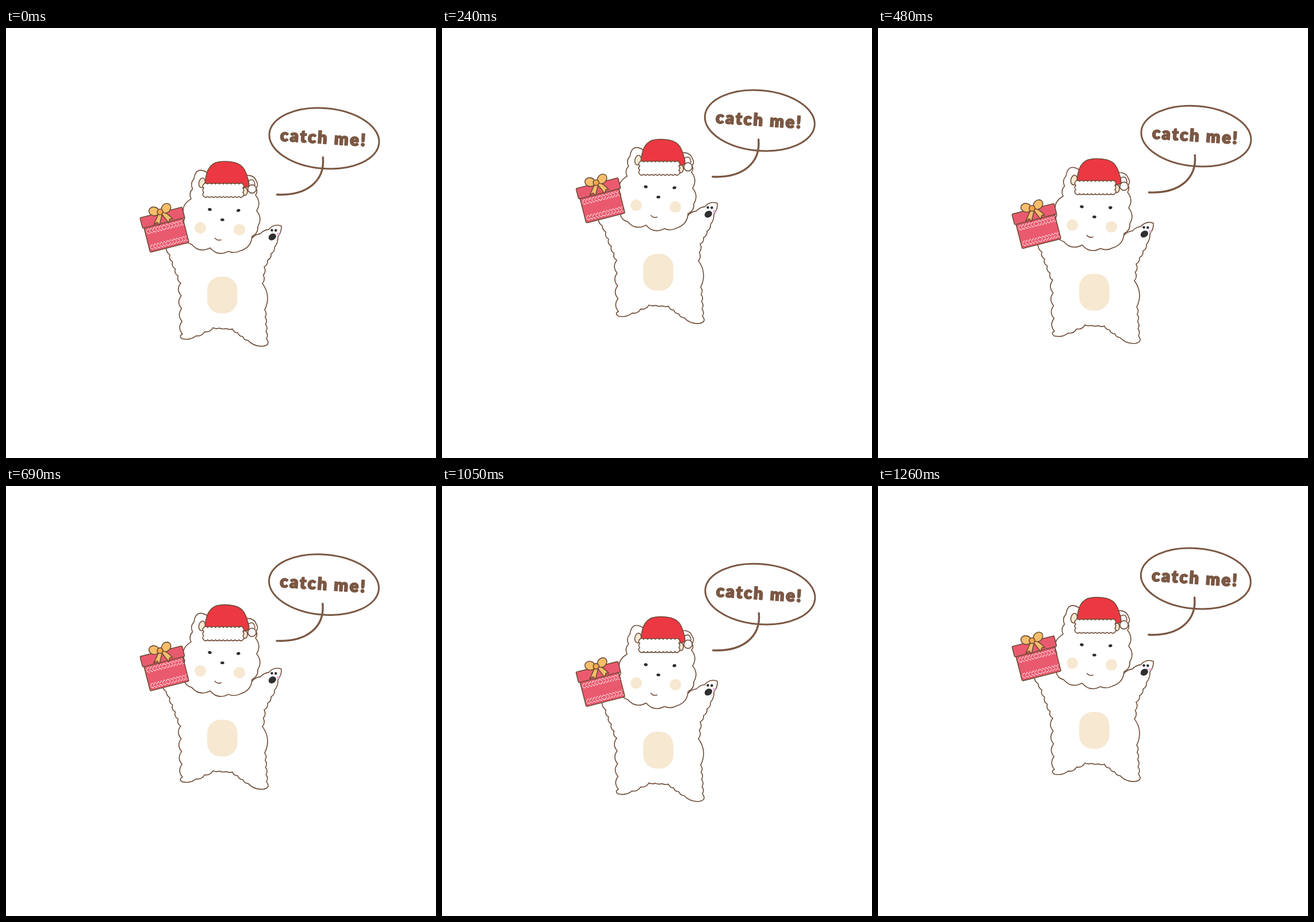
Write an HTML page with a canvas that moves like this. It is 748 by 748 pixels and loops after 1440 ms.

```html
<!DOCTYPE html>
<html lang="en">
<head>
<meta charset="utf-8">
<title>Catch me</title>
<style>
html, body { margin: 0; width: 100%; height: 100%; overflow: hidden; background: #fff; }
canvas { display: block; width: 748px; height: 748px; }
</style>
</head>
<body>
<canvas id="stage" width="748" height="748"></canvas>
<script>
const ctx = document.getElementById('stage').getContext('2d');
const LINE = '#6f4c37', BUBBLE = '#7b5844', CREAM = '#f7e8d2', DARK = '#2f2e30';
const PINK = '#ea5a6f', GOLD = '#f6be6b', RED = '#ec3842';

// Woolly outline, clockwise: each run goes to x, y in a number of outward bumps.
function wool([x, y], runs) {
  const path = new Path2D();
  path.moveTo(x, y);
  for (const [endX, endY, count = 1, bulge = 0.35] of runs) {
    const dx = (endX - x) / count, dy = (endY - y) / count;
    for (let i = 0; i < count; i++) {
      path.quadraticCurveTo(x + dx / 2 + dy * bulge, y + dy / 2 - dx * bulge, x + dx, y + dy);
      x += dx;
      y += dy;
    }
  }
  return path;
}

function paint(path, fill, stroke = LINE, width = 1.6) {
  if (fill) { ctx.fillStyle = fill; ctx.fill(path); }
  if (stroke) { ctx.strokeStyle = stroke; ctx.lineWidth = width; ctx.stroke(path); }
}

function oval(x, y, rx, ry, fill, turn = 0, stroke = null, width) {
  const path = new Path2D();
  path.ellipse(x, y, rx, ry, turn, 0, Math.PI * 2);
  paint(path, fill, stroke, width);
}

function block(x, y, w, h, radius, fill, stroke) {
  const path = new Path2D();
  path.roundRect(x, y, w, h, radius);
  paint(path, fill, stroke);
}

const body = wool([428, 365], [
  [457, 350, 2, 0.2], [479, 344], [467, 381, 2, 0.2], [449, 415, 3], [446, 444, 2],
  [450, 490, 1, 0.3], [453, 540, 4], [448, 553, 1, 0.8], [421, 543, 1, 0.25],
  [394, 523, 3], [360, 521, 3, 0.2], [331, 535, 2], [306, 540, 1, 0.25], [307, 532, 1, 0.8],
  [304, 443, 4, 0.4], [285, 394, 4, 0.4], [272, 372, 2, 0.25]]);
const head = wool([322, 297], [
  [327, 262, 2], [350, 251, 1, 0.75], [421, 256, 1, 0], [436, 267], [434, 290, 2],
  [438, 345, 2], [428, 362], [408, 387], [387, 388, 1, 0.25], [323, 376, 2, 0.4],
  [310, 362], [311, 330, 1, 0.2], [322, 297, 1, 0.45]]);
const band = wool([344, 271.5], [
  [412, 271.5, 10, 0.5], [412, 293, 3, 0.5], [344, 293, 10, 0.5], [344, 271.5, 3, 0.5]]);
const pompom = wool([435, 280], Array.from({ length: 8 }, (_, i) => {
  const a = (i + 1) * Math.PI / 4;
  return [428 + 7 * Math.cos(a), 280 + 7 * Math.sin(a)];
}));
const earFold = new Path2D('M421 266Q432 259 433 273');
const smile = new Path2D('M363.5 365Q367 370 374 368');
const cap = new Path2D('M346 274C347 254 351 240 365 234Q380 230 398 234C413 238 417 249 420 260Q424 270 422 276L412 278Z');
const streamers = new Path2D('M266 322L257 342L263 338L267 343L272 322ZM269 321L283 339L285 332L290 332Q281 322 272 319Z');
const tail = new Path2D('M551.3 225C555 265 525 292 471.5 289.8');

function drawBear() {
  paint(body, '#fff');
  oval(462.5, 351.3, 2.3, 2.3, DARK);
  oval(469.3, 351.7, 2.3, 2.3, DARK);
  oval(473.3, 358.3, 2.4, 2.4, '#f2b2e6');
  oval(463.3, 363, 7, 5.5, DARK, -0.6);
  block(350, 432, 52.5, 64, 23, CREAM, null);
  paint(head, '#fff');
  oval(341, 269, 5.5, 8.5, CREAM, 0.2, LINE, 1.6);
  oval(415, 284, 5, 7, CREAM, 0, LINE, 1.6);
  paint(earFold);
  oval(354.5, 315.3, 3.3, 2.5, DARK, 0.25);
  oval(404.3, 317, 3.3, 2.5, DARK, -0.25);
  oval(376.4, 333.2, 3.4, 2.4, DARK, 0.1);
  oval(338, 347.3, 10, 10, CREAM);
  oval(406, 350.3, 10, 10, CREAM);
  paint(smile);
}

function drawHat() {
  paint(cap, RED);
  paint(band, '#fff');
  paint(pompom, '#fff');
}

// Chevrons that point outwards from the middle, between two dashed rows.
function ribbon(y) {
  const path = new Path2D();
  for (let x = 4; x < 68; x += 5.5) {
    const tip = x < 35 ? -1.5 : 1.5;
    for (const side of [-1, 1]) {
      path.moveTo(x - tip, y + side * 3.2);
      path.lineTo(x + tip, y + side);
      path.moveTo(x + 1.6, y + side * 4);
      path.lineTo(x + 3.6, y + side * 4);
    }
  }
  paint(path, null, '#fdeaec', 1);
}

function drawGift() {
  ctx.save();
  ctx.translate(240, 347.5);
  ctx.rotate(-0.25);
  block(0, 0, 69.5, 44, 2, PINK);
  ribbon(8);
  ribbon(36);
  block(-2.5, -18.5, 75.5, 19, 2, PINK);
  ctx.restore();
  paint(streamers, GOLD);
  oval(257.5, 319, 9, 7.5, GOLD, 0.2, LINE, 1.6);
  oval(278.5, 313.5, 9, 7.5, GOLD, -0.8, LINE, 1.6);
  oval(268, 320, 5, 5, '#f2a64d', 0, LINE, 1.6);
}

function drawBubble() {
  oval(553.5, 192, 95.8, 52.4, null, 0.088, BUBBLE, 3);
  paint(tail, null, BUBBLE, 3.4);
  ctx.save();
  ctx.translate(552, 201);
  ctx.rotate(0.064);
  ctx.font = '900 29px Lato, sans-serif';
  ctx.letterSpacing = '2.8px';
  ctx.textAlign = 'center';
  ctx.fillStyle = ctx.strokeStyle = BUBBLE;
  ctx.lineWidth = 2;
  ctx.fillText('catch me!', 0, 0);
  ctx.strokeText('catch me!', 0, 0);
  ctx.restore();
}

// Height of the jump over time, linear between keys.
const keys = [[0, 0], [240, 1], [270, 0.99], [510, 0], [528, 0], [774, 1], [1020, 0], [1260, 1]];
function lift(ms) {
  const i = Math.max(1, keys.findIndex(key => key[0] >= ms));
  const [t0, a] = keys[i - 1], [t1, b] = keys[i];
  return a + (b - a) * (ms - t0) / (t1 - t0);
}

function shifted(dx, dy, draw) {
  ctx.save();
  ctx.translate(dx, dy);
  draw();
  ctx.restore();
}

const start = performance.now();
function render() {
  const time = (performance.now() - start) % 1440;
  const up = lift(Math.min(1260, Math.floor(time / 30) * 30));
  ctx.fillStyle = '#fff';
  ctx.fillRect(0, 0, 748, 748);
  ctx.lineCap = ctx.lineJoin = 'round';
  shifted(0, 0.4 - 39.5 * up, drawBear);
  shifted(0, -38.5 * up, drawHat);
  shifted(0, -51 * up, drawGift);
  shifted(-0.7 * up, -31 * up, drawBubble);
  requestAnimationFrame(render);
}
render();
</script>
</body>
</html>
```
